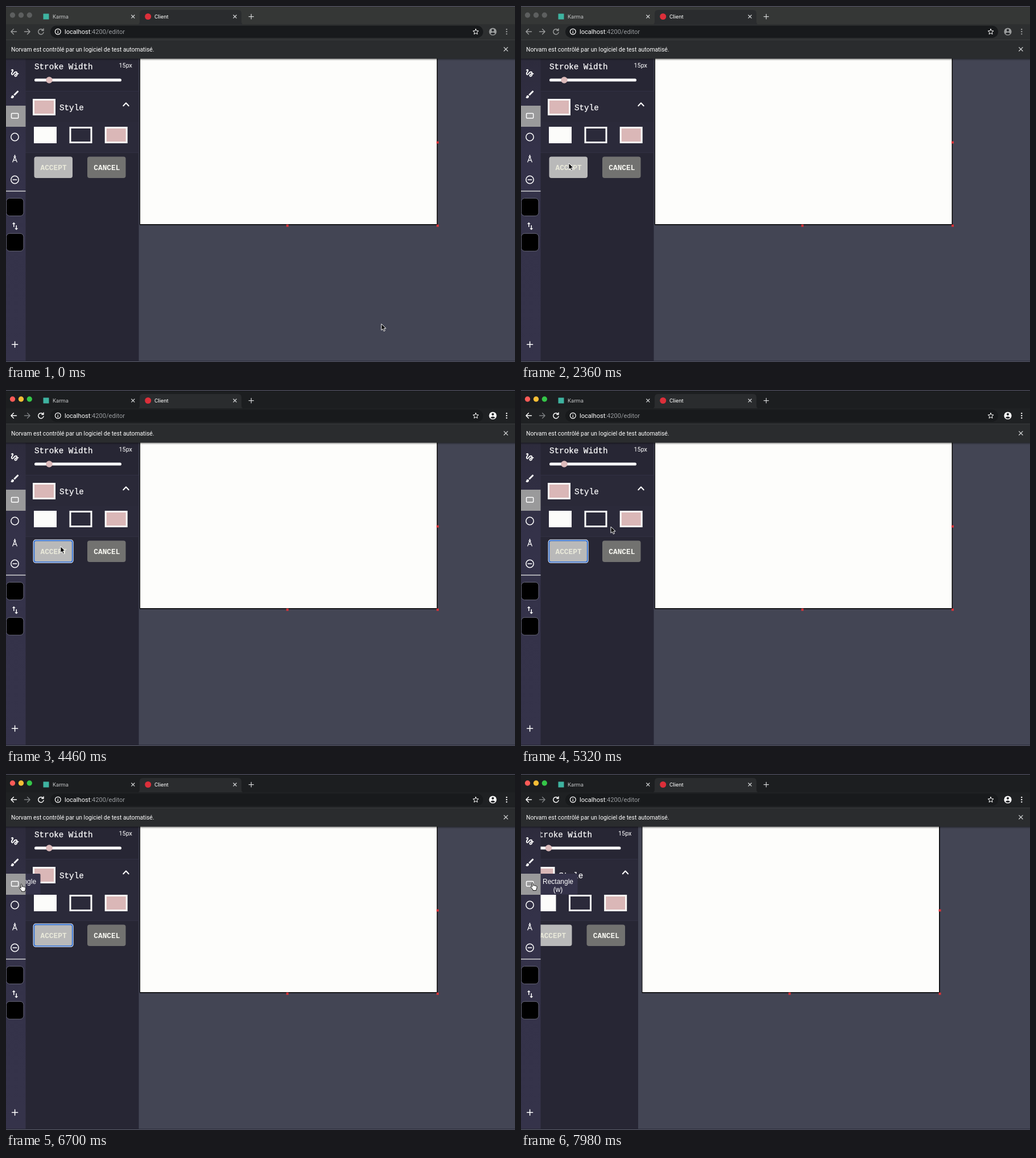
Recreate the animation shown at these times as an HTML page. Size 895 by 625 pixels, loop 8 s.

```html
<!DOCTYPE html>
<html lang="fr">
<head>
<meta charset="utf-8">
<title>Client</title>
<style>
html, body { margin: 0; width: 100%; height: 100%; overflow: hidden; background: #434554; }
svg { display: block; width: 100vw; height: 100vh; }
text { font-family: Roboto, "Liberation Sans", sans-serif; fill: #fff; }
.mono { font-family: "Courier New", "Liberation Mono", monospace; font-size: 14.25px; stroke: #fff; stroke-width: .25; }
.btn { font-size: 12.8px; font-weight: 700; stroke: none; }
.tip { font: 12px "Liberation Sans", Arial, sans-serif; text-anchor: middle; }
.line { fill: none; stroke: #fff; stroke-width: 1.5; stroke-linecap: round; stroke-linejoin: round; }
.thin { stroke-width: 1.2; }
.frame { fill: #1c1e20; }
.bar { fill: #2a2c2e; }
.strip { fill: #1f2123; }
.omni { fill: #181a1c; }
.fwd { stroke: #7d8082; }
.away .frame { fill: #353736; }
.away .strip { fill: #2d2f30; }
.away .light { fill: #5d5f5f; }
.away .nav, .away .fwd { stroke: #9a9c9c; }
.away .dim { fill: #9a9c9c; }
</style>
</head>
<body>
<svg viewBox="0 0 895 625" preserveAspectRatio="none">
  <defs>
    <linearGradient id="shade" x2="0" y2="1">
      <stop offset="0" stop-opacity=".45"/><stop offset="1" stop-opacity="0"/>
    </linearGradient>
    <linearGradient id="side" x2="0" y2="1">
      <stop offset="0" stop-color="#2d2b3c"/><stop offset=".3" stop-color="#343249"/><stop offset="1" stop-color="#35334a"/>
    </linearGradient>
  </defs>
  <rect width="895" height="625" fill="#434554"/>

  <g id="sheet">
    <rect x="235" y="90" width="524" height="294.5" fill="#000"/>
    <rect x="236" y="90" width="521.5" height="293" fill="#fdfdfb"/>
    <g fill="#d93338">
      <rect x="757" y="237.500" width="4" height="4"/>
      <rect x="492.800" y="383.700" width="4" height="4"/>
      <rect x="757" y="383.700" width="4" height="4"/>
    </g>
  </g>

  <g id="panel">
    <rect x="30" y="90" width="203.5" height="535" fill="#272634"/>
    <rect x="30" y="150" width="203.5" height="54" fill="#2a2938"/>
    <rect x="30" y="204" width="203.5" height="54" fill="#2b2a3a"/>
    <path d="M30 149.5H233M30 257.5H233" stroke="#313042"/>
    <text class="mono" x="50" y="110.5">Stroke Width</text>
    <text x="198.5" y="107.5" font-size="10.8">15px</text>
    <rect x="50" y="127.4" width="153" height="5.2" rx="2.6" fill="#fff"/>
    <circle cx="76" cy="130" r="5.8" fill="#dcbaba"/>
    <text class="mono" x="94" y="183">Style</text>
    <path class="line" d="M206.3 175.2l4.7-5 4.7 5" style="stroke-width:2"/>
    <g stroke="#fcfcfa" stroke-width="3">
      <rect x="48.5" y="164.5" width="37" height="26" fill="#dab7b7"/>
      <rect x="50.5" y="213.5" width="37" height="26" fill="#fcfcfa"/>
      <rect x="113" y="213.5" width="37" height="26" fill="none"/>
      <rect x="175.2" y="213.5" width="37" height="26" fill="#dab7b7"/>
    </g>
    <rect x="49.5" y="264.5" width="67.5" height="37.5" rx="4" fill="#b9b9b9"/>
    <rect x="143" y="264.5" width="67.5" height="37.5" rx="4" fill="#727270"/>
    <text class="mono btn" x="60.5" y="288" style="fill:#eaeadb">ACCEPT</text>
    <text class="mono btn" x="154.3" y="288" style="fill:#f8f8f2">CANCEL</text>
    <g id="ring" fill="none">
      <rect x="48.7" y="263.7" width="68.800" height="39" rx="3.500" stroke="#fff" stroke-width="2.200"/>
      <rect id="blue" x="49.400" y="264.400" width="67.400" height="37.600" rx="3" stroke="#2467d2" stroke-width="1.700"/>
    </g>
  </g>

  <g id="tip">
    <rect x="30" y="175" width="69.5" height="36.5" rx="2" fill="#343249"/>
    <text class="tip" x="65" y="192.5">Rectangle</text>
    <text class="tip" x="65" y="206.5">(w)</text>
  </g>

  <rect y="90" width="34.5" height="535" fill="url(#side)"/>
  <rect y="175" width="34.5" height="37" fill="#9a9a9b"/>
  <g fill="#fff">
    <path transform="translate(6.500 108.700) scale(.75)" d="M4.590 6.890c.7-.71 1.400-1.350 1.710-1.220.5.2 0 1.030-.3 1.520-.25.42-2.860 3.890-2.860 6.310 0 1.280.48 2.340 1.340 2.980.75.56 1.740.73 2.640.46 1.070-.31 1.950-1.400 3.060-2.770 1.210-1.490 2.830-3.440 4.080-3.440 1.630 0 1.650 1.010 1.760 1.790-3.780.64-5.380 3.670-5.380 5.370 0 1.700 1.440 3.090 3.210 3.090 1.630 0 4.290-1.330 4.690-6.100H21v-2.500h-2.470c-.15-1.650-1.090-4.200-4.030-4.200-2.250 0-4.180 1.910-4.940 2.840-.58.73-2.060 2.480-2.290 2.720-.25.3-.68.84-1.110.84-.45 0-.72-.83-.36-1.920.35-1.090 1.400-2.860 1.850-3.520.78-1.140 1.300-1.920 1.300-3.280C8.950 3.690 7.310 3 6.440 3 5.120 3 3.970 4 3.720 4.250c-.36.36-.66.66-.88.93zm9.290 11.660c-.31 0-.74-.26-.74-.72 0-.6.73-2.200 2.870-2.760-.3 2.690-1.430 3.480-2.130 3.480z"/>
    <path transform="translate(6.500 146.300) scale(.75)" d="M7 14c-1.660 0-3 1.340-3 3 0 1.310-1.160 2-2 2 .92 1.220 2.490 2 4 2 2.210 0 4-1.790 4-4 0-1.660-1.340-3-3-3zm13.710-9.370l-1.340-1.340q-.7-.6-1.410 0L9 12.250 11.750 15l8.960-8.960q.6-.7 0-1.410z"/>
    <path transform="translate(7 377.500) scale(.75)" d="M16 17V10h-2v7h-3l4 4 4-4zM9 3L5 7h3v7h2V7h3z"/>
  </g>
  <g class="line">
    <rect x="9.5" y="188.600" width="12.200" height="8.300" rx="1.200"/>
    <circle cx="15.500" cy="230" r="6.700"/>
    <path class="thin" d="M15.500 261.500v2M14.900 266l-3.200 8M16.100 266l3.200 8M13 270.300q2.500 1.500 5 0"/>
    <circle class="thin" cx="15.500" cy="264.700" r="1.300"/>
    <circle cx="15.500" cy="305" r="6.700"/>
    <path d="M12.200 305h6.600M10.600 594.300h10M15.600 589.300v10"/>
  </g>
  <rect y="324" width="34.500" height="2" fill="#a9a9b0"/>
  <g fill="#000" stroke="#666678">
    <rect x=".5" y="337.500" width="30.500" height="31" rx="6"/>
    <rect x=".5" y="399.300" width="30.500" height="31" rx="6"/>
  </g>
  <rect y="623" width="895" height="1" fill="#252633"/>
  <rect y="624" width="895" height="1" fill="#5d5e6c"/>

  <g id="browser">
    <rect y="92" width="895" height="4" fill="url(#shade)"/>
    <rect class="frame" width="895" height="33"/>
    <rect width="895" height="1" fill="#59586c"/>
    <path class="bar" d="M229 33q6 0 6-6V13q0-6 6-6H408q6 0 6 6V27q0 6 6 6z"/>
    <rect class="strip" y="32" width="895" height="28"/>
    <rect class="omni" x="78" y="34.500" width="761" height="21.500" rx="10.700"/>
    <rect class="bar" y="59.500" width="895" height="33"/>
    <rect y="59" width="895" height="1" fill="#3a3c3e"/>
    <circle class="light" cx="11.500" cy="16" r="4.700" fill="#fc5b57"/>
    <circle class="light" cx="26.500" cy="16" r="4.700" fill="#f5bd35"/>
    <circle class="light" cx="41.300" cy="16" r="4.700" fill="#35c648"/>
    <rect x="65.500" y="13.500" width="10" height="10" fill="#3eb3a0"/>
    <text x="82" y="22" font-size="9.500" style="fill:#c4c6c7">Karma</text>
    <circle cx="249.700" cy="18.500" r="5.500" fill="#dc2f3a"/>
    <text x="261" y="22" font-size="9.700">Client</text>
    <g class="line thin">
      <path d="M220.700 16l5.200 5.200m0-5.200l-5.200 5.200M399.900 16l5.200 5.200m0-5.200l-5.200 5.200M427 18.600h8.400m-4.200-4.200v8.400M875.700 72.600l6.400 6.400m0-6.400l-6.400 6.400" style="stroke:#d5d7d8"/>
      <path class="nav" d="M18.500 45H9m4.400-4.500L8.900 45l4.500 4.500" stroke-width="1.400"/>
      <path class="fwd" d="M32.500 45H42m-4.400-4.500l4.500 4.500-4.500 4.500" stroke-width="1.400"/>
      <path class="nav" d="M65.200 42.300a4.700 4.700 0 1 0 .9 3.800M66 39.700v3.300h-3.300" stroke-width="1.400"/>
      <circle cx="91.300" cy="45" r="4.900"/>
      <path d="M91.300 44.700v2.700M91.300 42.600v.1"/>
      <path d="M826 40.300l1.400 3.200 3.500.3-2.700 2.300.8 3.400-3-1.800-3 1.800.8-3.400-2.700-2.300 3.500-.3z" stroke-width="1"/>
    </g>
    <circle class="dim" cx="856" cy="45" r="6.600" fill="#fff"/>
    <g fill="#25272a">
      <circle cx="856" cy="42.700" r="2.100"/>
      <path d="M851.800 48.600q4.200-4 8.400 0q-4.200 3.400-8.400 0z"/>
    </g>
    <g class="dim" fill="#fff">
      <circle cx="880.300" cy="40.900" r="1.200"/><circle cx="880.300" cy="45" r="1.200"/><circle cx="880.300" cy="49.100" r="1.200"/>
    </g>
    <text x="103" y="48.700" font-size="11.100">localhost<tspan style="fill:#9a9da0">:4200/editor</tspan></text>
    <text x="9" y="79.700" font-size="10.350">Norvam est contrôlé par un logiciel de test automatisé.</text>
  </g>

  <path id="arrow" d="M0 0V11.200l2.600-2.400 1.800 4.100 2-.9-1.800-4H8.200z" fill="#000" stroke="#fff" stroke-width="1" stroke-linejoin="round"/>
  <path id="hand" d="M-2.800 1c0-1.700 2.200-1.700 2.300 0l.3 3.500c.6-1 2-.8 2.200.3c.7-.8 1.900-.4 2 .5c.9-.6 2 0 2 1.200c0 2.300-.3 3.600-1.300 5.200v1.300H-1v-1.200c-1.500-1.500-2.300-3.200-3.700-4.700c-.9-1.300.6-2.100 1.500-1.300l1 .9z" fill="#fff" stroke="#111" stroke-width="1" stroke-linejoin="round"/>
</svg>
<script>
const LOOP = 8000;
const $ = id => document.getElementById(id);
const show = (id, on) => $(id).setAttribute('visibility', on ? 'visible' : 'hidden');
const move = (id, x, y = 0) => $(id).setAttribute('transform', `translate(${x} ${y})`);
const span = (t, from, to) => Math.min(1, Math.max(0, (t - from) / (to - from)));
const smooth = p => p * p * (3 - 2 * p);

// Pointer stops: time, x, y
const stops = [
  [20, 660, 558], [820, 140, 342], [1000, 125, 331], [1600, 92, 284],
  [2360, 84, 276], [3200, 83, 281], [4250, 83, 281], [5000, 150, 248],
  [5320, 158, 240], [5800, 150, 232], [6600, 30, 194], [6700, 28.5, 193.5],
  [7440, 22, 191.5], [LOOP, 22, 191.5]
];

function pointer(t) {
  const i = Math.max(1, stops.findIndex(s => t < s[0]));
  const [a, b] = [stops[i - 1], stops[i]];
  const p = smooth(span(t, a[0], b[0]));
  return [a[1] + (b[1] - a[1]) * p, a[2] + (b[2] - a[2]) * p];
}

function draw(t) {
  const [x, y] = pointer(t);
  const hover = x < 34;
  move('arrow', x, y);
  move('hand', x, y);
  show('arrow', !hover);
  show('hand', hover);

  $('browser').setAttribute('class', t < 3220 ? 'away' : '');
  show('ring', t >= 3220 && t < 7880);
  show('blue', t >= 3420 && t < 7880);

  move('tip', -70 + 70 * smooth(span(t, 6590, 6830)));
  show('tip', t > 6590);

  const slide = span(t, 7880, 7980);
  move('panel', -27.5 * slide);
  move('sheet', -22.5 * slide);
}

function tick(now) {
  draw(now % LOOP);
  requestAnimationFrame(tick);
}
draw(0);
requestAnimationFrame(tick);
</script>
</body>
</html>
```
